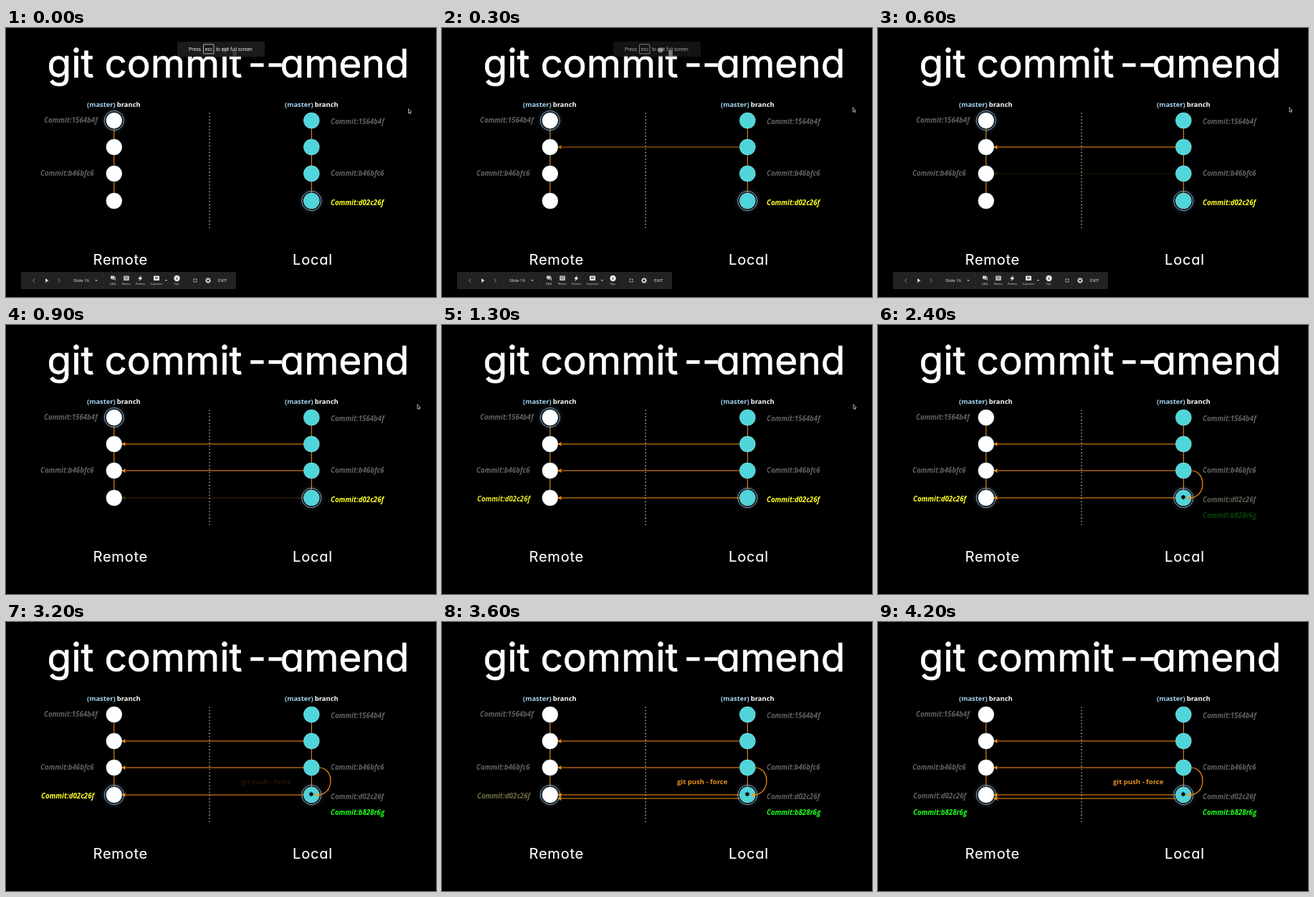
Recreate the animation shown at these times as an HTML page with a canvas. Size 600 by 375 pixels, loop 4300 ms.

```html
<!DOCTYPE html>
<html lang="en">
<head>
<meta charset="utf-8">
<title>git commit --amend</title>
<style>
html, body { margin: 0; width: 100%; height: 100%; overflow: hidden; background: #000; }
svg, canvas { position: absolute; left: 0; top: 0; width: 600px; height: 375px; }
text {
  font-family: Inter, sans-serif;
  font-feature-settings: "cv11";
  font-variant-ligatures: none;
  text-anchor: middle;
  fill: #fff;
  stroke: #fff;
  stroke-linejoin: round;
}
.title { font-size: 55px; stroke-width: 0.7px; }
.side { font-size: 20px; letter-spacing: 0.8px; stroke-width: 0.15px; }
</style>
</head>
<body>
<svg viewBox="0 0 600 375">
  <g class="title">
    <text x="90" y="69">git</text>
    <text x="233.5" y="69">commit</text>
    <text x="363" y="69">--</text>
    <text x="472.5" y="69">amend</text>
  </g>
  <g class="side">
    <text x="159.8" y="330">Remote</text>
    <text x="428" y="330">Local</text>
  </g>
</svg>
<canvas id="stage"></canvas>
<script>
const LOOP = 4300, STEP = 100;
const ORANGE = '#ff9414', CYAN = '#50d5da', GREY = '#606060', YELLOW = '#ffff24', GREEN = '#1cff1c', ICON = '#d2d2d2';
const LEFT = 150.8, RIGHT = 426.3, ROWS = [129, 166, 203, 241];

const canvas = document.getElementById('stage');
const ctx = canvas.getContext('2d');
const ratio = window.devicePixelRatio || 1;
canvas.width = 600 * ratio;
canvas.height = 375 * ratio;

// Eased progress from 0 to 1 between two times.
function ramp(t, from, to) {
  const p = Math.min(1, Math.max(0, (t - from) / (to - from)));
  return p * p * (3 - 2 * p);
}

function faded(alpha, draw) {
  if (alpha <= 0) return;
  ctx.save();
  ctx.globalAlpha *= alpha;
  draw();
  ctx.restore();
}

function text(str, x, y, font, color, align = 'left') {
  ctx.font = font;
  ctx.fillStyle = color;
  ctx.textAlign = align;
  ctx.fillText(str, x, y);
}

function disc(x, y, r, color) {
  ctx.fillStyle = color;
  ctx.beginPath();
  ctx.arc(x, y, r, 0, Math.PI * 2);
  ctx.fill();
}

function path(points, color, width, closed) {
  ctx.beginPath();
  points.forEach(([x, y], i) => i ? ctx.lineTo(x, y) : ctx.moveTo(x, y));
  if (closed) {
    ctx.closePath();
    ctx.fillStyle = color;
    ctx.fill();
  } else {
    ctx.strokeStyle = color;
    ctx.lineWidth = width;
    ctx.stroke();
  }
}

function box(x, y, w, h, r, color, stroked) {
  ctx.beginPath();
  ctx.roundRect(x, y, w, h, r);
  if (stroked) {
    ctx.strokeStyle = color;
    ctx.lineWidth = 0.8;
    ctx.stroke();
  } else {
    ctx.fillStyle = color;
    ctx.fill();
  }
}

function commit(hash, x, y, color) {
  text('Commit:' + hash, x, y, 'italic bold 9.7px "Open Sans", sans-serif', color);
}

function arrowHead(x, y) {
  path([[x, y], [x + 6, y - 3], [x + 4.6, y], [x + 6, y + 3]], ORANGE, 0, true);
}

function arrow(y, alpha) {
  faded(alpha, () => {
    path([[416, y], [164, y]], ORANGE, 1.2);
    arrowHead(161, y);
  });
}

function ring(x, y, alpha) {
  faded(alpha, () => {
    ctx.strokeStyle = '#86a3bb';
    ctx.lineWidth = 1;
    ctx.shadowColor = '#6c8ca8';
    ctx.shadowBlur = 5 * ratio;
    ctx.beginPath();
    ctx.arc(x, y, 13.6, 0, Math.PI * 2);
    ctx.stroke();
  });
}

function column(x, color, edge) {
  path([[x, ROWS[0]], [x, ROWS[3]]], '#ee8e1c', 1.1);
  for (const y of ROWS) {
    disc(x, y, 11.2, edge);
    disc(x, y, 10.6, color);
  }
}

function star(x, y) {
  const pts = [];
  for (let i = 0; i < 12; i++) {
    const a = i * Math.PI / 6 - Math.PI / 2, r = i % 2 ? 2.1 : 4;
    pts.push([x + r * Math.cos(a), y + r * Math.sin(a)]);
  }
  path(pts, '#05070c', 0, true);
}

function branchLabel(x) {
  const font = 'bold 9.4px "Open Sans", sans-serif';
  text('(master)', x, 110, font, '#a5d5f3');
  text('branch', x + 41.8, 110, font, '#fff');
}

function banner() {
  const font = '6.7px Roboto, sans-serif';
  box(239, 19, 122, 21, 2, 'rgba(32,32,33,0.87)');
  text('Press', 255, 32, font, '#e8e8e8');
  box(275.5, 22.8, 14.5, 13, 1, '#d8d8d8', true);
  text('esc', 282.8, 31.6, font, '#e8e8e8', 'center');
  text('to exit full screen', 293, 32, font, '#e8e8e8');
}

function chevron(x, dir, color) {
  path([[x - dir * 1.2, 349.3], [x + dir * 1.4, 352], [x - dir * 1.2, 354.7]], color, 0.9);
}

function dropMark(x) {
  path([[x - 2, 351], [x + 2, 351], [x, 353.2]], '#a0a0a0', 0, true);
}

function toolbar() {
  box(21, 340, 300, 24, 1, '#222222');
  chevron(39, -1, '#969696');
  path([[55, 349], [59.5, 352], [55, 355]], ICON, 0, true);
  chevron(74, 1, '#969696');
  text('Slide 16', 94, 354.2, '6.2px Roboto, sans-serif', ICON);
  dropMark(126);
  dropMark(223.5);
  for (const x of [84.5, 135.5, 251.5]) path([[x, 341], [x, 363]], '#2d2d2d', 0.7);

  const labels = [['Q&A', 149], ['Notes', 168], ['Pointer', 187.5], ['Captions', 210], ['Tips', 238]];
  for (const [label, x] of labels) text(label, x, 358, '4.3px Roboto, sans-serif', '#c4c4c4', 'center');

  box(146, 345.5, 5.5, 4.2, 0.4, ICON);
  path([[152.3, 347], [153, 347], [153, 352.3], [151.5, 351], [147.5, 351], [147.5, 350.4], [152.3, 350.4]], ICON, 0, true);
  box(164.2, 345.5, 7.6, 6.5, 0.6, ICON);
  for (const y of [347.1, 348.7, 350.3]) path([[165.5, y], [170.5, y]], '#333', 0.6);
  path([[189, 345], [184, 349.5], [186.7, 349.8], [185.5, 353], [190.5, 348.6], [187.8, 348.2]], '#f2f2f2', 0, true);
  box(206, 345.4, 8, 6.6, 0.8, '#eeeeee');
  text('cc', 210, 350.2, 'bold 4.5px Roboto, sans-serif', '#222', 'center');
  disc(238.5, 349, 4.2, '#eeeeee');
  text('i', 238.5, 351.3, 'bold 6px Roboto, sans-serif', '#222', 'center');

  for (const dx of [-1, 1]) for (const dy of [-1, 1]) {
    const x = 264 + dx * 1.2, y = 352 + dy * 1.2;
    path([[x + dx * 1.7, y], [x, y], [x, y + dy * 1.7]], ICON, 0.8);
  }
  for (let i = 0; i < 8; i++) {
    const a = i * Math.PI / 4;
    path([[282, 352], [282 + 4 * Math.cos(a), 352 + 4 * Math.sin(a)]], ICON, 1.4);
  }
  disc(282, 352, 3.1, ICON);
  disc(282, 352, 1.5, '#222');
  text('EXIT', 296, 354.2, '6px Roboto, sans-serif', '#e0e0e0');
}

function cursor(x, y) {
  const shape = [[0, -3.4], [0, 3], [1.4, 1.8], [2.4, 3.8], [3.3, 3.3], [2.4, 1.4], [4.2, 1.3]]
    .map(([dx, dy]) => [x + dx, y + dy]);
  path(shape, '#111', 0, true);
  path([...shape, shape[0]], '#c8c8c8', 0.8);
}

function amendArc() {
  ctx.strokeStyle = ORANGE;
  ctx.lineWidth = 1.2;
  ctx.beginPath();
  ctx.moveTo(437, 203);
  ctx.bezierCurveTo(458, 203, 459.5, 241, 434, 241);
  ctx.stroke();
  arrowHead(430.5, 241);
}

function render(t) {
  ctx.setTransform(ratio, 0, 0, ratio, 0, 0);
  ctx.clearRect(0, 0, 600, 375);

  branchLabel(113);
  branchLabel(389);
  for (let y = 119; y < 279; y += 4.55) disc(284, y, 0.8, '#d0d0d0');

  column(LEFT, '#fff', '#c4def2');
  column(RIGHT, CYAN, '#7ce0e6');
  const moved = ramp(t, 1400, 1800);
  ring(LEFT, ROWS[0], 1 - moved);
  ring(LEFT, ROWS[3], moved);
  ring(RIGHT, ROWS[3], 1);

  arrow(166, ramp(t, 0, 450));
  arrow(203, ramp(t, 500, 900));
  arrow(241, ramp(t, 770, 1170));
  arrow(246, ramp(t, 3250, 3650));

  commit('1564b4f', 53, 132, GREY);
  commit('1564b4f', 453, 134, GREY);
  commit('b46bfc6', 48, 206, GREY);
  commit('b46bfc6', 453, 206, GREY);

  const remoteOld = ramp(t, 3400, 3750), localOld = ramp(t, 2050, 2500);
  faded(ramp(t, 1000, 1370) * (1 - remoteOld), () => commit('d02c26f', 49, 245.5, YELLOW));
  faded(remoteOld, () => commit('d02c26f', 49, 245.5, GREY));
  faded(1 - localOld, () => commit('d02c26f', 453, 246.5, YELLOW));
  faded(localOld, () => commit('d02c26f', 453, 246.5, GREY));
  faded(ramp(t, 2250, 2700), () => commit('b828r6g', 453, 269, GREEN));
  faded(ramp(t, 3600, 4000), () => commit('b828r6g', 49, 269, GREEN));

  faded(ramp(t, 1500, 1900), () => {
    amendArc();
    star(426, 240);
  });
  faded(ramp(t, 3100, 3520), () =>
    text('git push - force', 328, 226, 'bold 9.5px "Open Sans", sans-serif', '#e8921f'));

  faded(1 - ramp(t, 150, 550), banner);
  faded(1 - ramp(t, 620, 850), toolbar);
  const shift = ramp(t, 0, 350);
  faded(1 - ramp(t, 1350, 1650), () => cursor(561.5 + 12.5 * shift, 116 - 2 * shift));
}

const start = performance.now();
function tick() {
  const t = (performance.now() - start) % LOOP;
  render(Math.floor(t / STEP) * STEP);
  requestAnimationFrame(tick);
}
tick();
</script>
</body>
</html>
```
